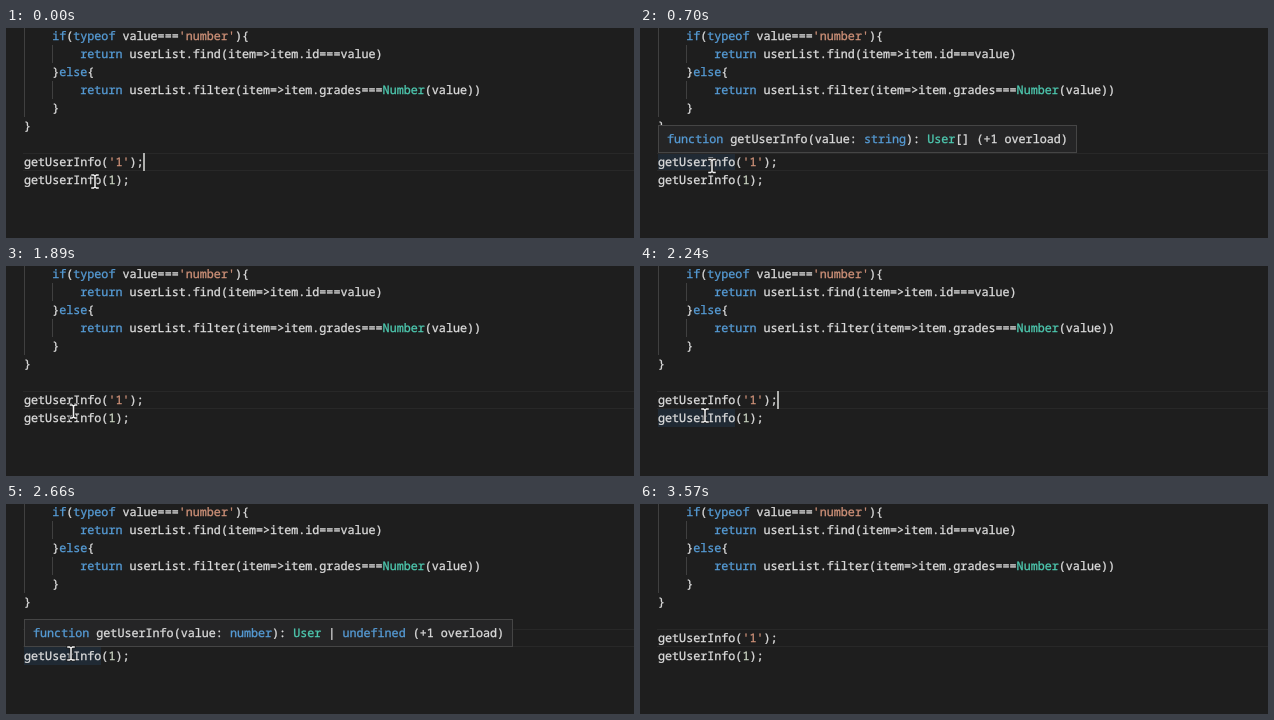
Write an HTML page that moves like this. It is 628 px wide and 210 px high and loops after 3.78 s.

```html
<!DOCTYPE html>
<html lang="en">
<head>
<meta charset="utf-8">
<title>Function overload hints</title>
<style>
  html, body { margin: 0; width: 100%; height: 100%; overflow: hidden; background: #1e1e1e; }
  svg { display: block; }
  text {
    font: 11.72px "Noto Sans Mono", "DejaVu Sans Mono", monospace;
    color: #dcdcdc; white-space: pre; text-rendering: geometricPrecision;
  }
  text, tspan { fill: currentColor; stroke: currentColor; stroke-width: 0.3; }
  .keyword { color: #569cd6; }
  .string { color: #ce9178; }
  .type { color: #4ec9b0; }
  .number { color: #c8d2c0; }
  .guide { fill: #404040; }
  .row { fill: #282828; }
  .box { fill: #252526; stroke: #454545; }
  .word { fill: #202a34; }
</style>
</head>
<body>
<svg id="stage" width="628" height="210" viewBox="0 0 628 210"></svg>
<script>
const LOOP = 3780, TICK = 70, CHAR = 7.033, LEFT = 18, LINE = 18;

const code = [
  "    if(typeof value==='number'){",
  "        return userList.find(item=>item.id===value)",
  "    }else{",
  "        return userList.filter(item=>item.grades===Number(value))",
  "    }",
  "}",
  "",
  "getUserInfo('1');",
  "getUserInfo(1);"
];

const tokens = /('[^']*')|\b(if|else|return|typeof|function|string|number|undefined)\b|\b(Number|User)\b|(?<!\+)\b(\d+)\b/g;
const kinds = ["string", "keyword", "type", "number"];

function highlight(line) {
  const escaped = line.replace(/>/g, "&gt;");
  return escaped.replace(tokens, (match, ...groups) => {
    const kind = kinds[groups.slice(0, 4).findIndex(Boolean)];
    return `<tspan class="${kind}">${match}</tspan>`;
  });
}

const rect = (x, y, w, h, cls) =>
  `<rect x="${x}" y="${y}" width="${w}" height="${h}" class="${cls}"/>`;

const text = (x, y, line) => `<text x="${x}" y="${y}">${highlight(line)}</text>`;

function codeLine(line, row) {
  const body = line.trimStart();
  return text(LEFT + (line.length - body.length) * CHAR, 12 + row * LINE, body);
}

const tooltip = (id, y, width, line) =>
  `<g id="${id}">${rect(18.5, y + 0.5, width - 1, 27, "box")}${text(27, y + 18, line)}</g>`;

const beam = "M-3 -6.5H-1.5L0 -5.5L1.5 -6.5H3M0 -5.5V5.5M-3 6.5H-1.5L0 5.5L1.5 6.5H3";

const stage = document.getElementById("stage");
stage.innerHTML = [
  `<g id="word1">${rect(18, 125, 77, 18, "word")}</g>`,
  `<g id="word2">${rect(18, 143, 77, 18, "word")}</g>`,
  rect(17, 125, 611, 1, "row"),
  rect(17, 142, 611, 1, "row"),
  rect(18, 0, 1, 89, "guide"),
  rect(46, 17, 1, 18, "guide"),
  rect(46, 53, 1, 18, "guide"),
  ...code.map(codeLine),
  `<rect id="caret" x="137" y="125" width="2" height="18" fill="#aeafad"/>`,
  tooltip("tip1", 97, 419, "function getUserInfo(value: string): User[] (+1 overload)"),
  tooltip("tip2", 115, 489, "function getUserInfo(value: number): User | undefined (+1 overload)"),
  `<g id="pointer" fill="none" stroke-linecap="square">
     <path d="${beam}" stroke="#1a1a1a" stroke-width="3.2"/>
     <path d="${beam}" stroke="#f4f4f4" stroke-width="1.5"/>
   </g>`
].join("");

const [word1, word2, caret, tip1, tip2, pointer] =
  ["word1", "word2", "caret", "tip1", "tip2", "pointer"].map(id => document.getElementById(id));

// Pointer path: time, x, y
const path = [
  [70, 89, 153.5], [210, 85, 155], [350, 74, 141], [420, 72, 138],
  [1750, 72, 138], [1890, 67.5, 145.5], [2100, 65, 149.5],
  [3010, 65, 149.5], [3150, 69, 172], [3290, 73, 188]
];

function pointerAt(t) {
  const next = path.findIndex(point => point[0] > t);
  if (next === 0) return path[0].slice(1);
  if (next < 0) return path[path.length - 1].slice(1);
  const [t0, x0, y0] = path[next - 1], [t1, x1, y1] = path[next];
  const k = (t - t0) / (t1 - t0);
  return [x0 + (x1 - x0) * k, y0 + (y1 - y0) * k];
}

const during = (t, start, end) => t >= start && t < end;
const show = (node, opacity) => node.setAttribute("opacity", Number(opacity));
const fade = (t, start, end) => during(t, start, end) ? Math.min(1, (t - start + TICK) / (2 * TICK)) : 0;

const caretOn = [[0, 420], [910, 1400], [1960, 2450], [3080, 3570]];

function draw(time) {
  const t = Math.floor((time % LOOP) / TICK) * TICK;
  show(word1, during(t, 560, 1890));
  show(word2, during(t, 2240, 3150));
  show(tip1, fade(t, 630, 1890));
  show(tip2, fade(t, 2310, 3150));
  show(caret, caretOn.some(([start, end]) => during(t, start, end)));
  show(pointer, t < 3360);
  pointer.setAttribute("transform", `translate(${pointerAt(t)})`);
}

const began = performance.now();
function frame() {
  draw(performance.now() - began);
  requestAnimationFrame(frame);
}
frame();
</script>
</body>
</html>
```
